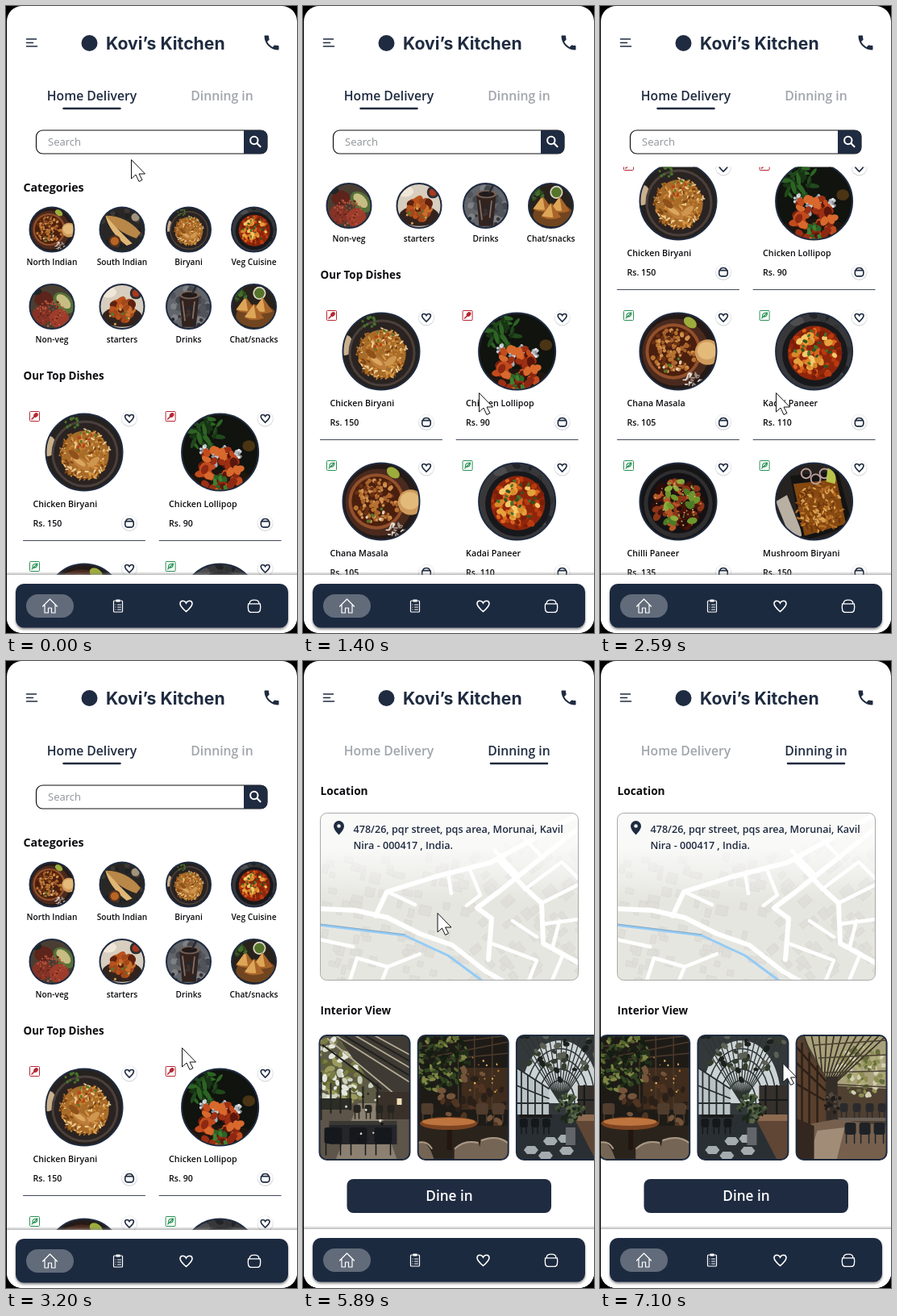
These frames come from a looping animation (361 by 777 pixels, 8 s). An HTML page:

```html
<!DOCTYPE html>
<html lang="en">
<head>
<meta charset="utf-8">
<title>Food ordering app</title>
<style>
html, body { margin: 0; width: 100%; height: 100%; overflow: hidden; background: #000; }
svg { display: block; width: 361px; height: 777px; }
text { font-family: "Open Sans", "Noto Sans", sans-serif; }
.brand { font-family: Inter, sans-serif; }
</style>
</head>
<body>
<svg id="stage" viewBox="0 0 361 777"></svg>
<script>
const LOOP = 8000;
const NAVY = '#1f2b40', INK = '#0c0c10', GREY = '#a1a5ab';

// ---------- drawing helpers ----------
const text = (x, y, s, size, weight = 600, fill = INK, anchor = 'start', cls = '') =>
  `<text x="${x}" y="${y}" font-size="${size}" font-weight="${weight}" fill="${fill}" text-anchor="${anchor}" class="${cls}">${s}</text>`;
const rect = (x, y, w, h, fill, more = '') =>
  `<rect x="${x}" y="${y}" width="${w}" height="${h}" fill="${fill}" ${more}/>`;
const circle = (x, y, r, fill, more = '') => `<circle cx="${x}" cy="${y}" r="${r}" fill="${fill}" ${more}/>`;
const oval = (x, y, rx, ry, fill, turn = 0) =>
  `<ellipse cx="${x}" cy="${y}" rx="${rx}" ry="${ry}" fill="${fill}" transform="rotate(${turn} ${x} ${y})"/>`;
const shape = (d, fill) => `<path d="${d}" fill="${fill}"/>`;
const line = (d, stroke, width = 1) =>
  `<path d="${d}" fill="none" stroke="${stroke}" stroke-width="${width}" stroke-linecap="round" stroke-linejoin="round"/>`;
const use = (id, x, y, scale = 1, more = '') =>
  `<use href="#${id}" transform="translate(${x} ${y}) scale(${scale})" ${more}/>`;

function random(seed) {
  return () => {
    seed = (seed * 16807) % 2147483647;
    return seed / 2147483647;
  };
}

// Scatters n morsels over a disc.
function morsels(seed, n, x, y, spread, size, colors, stretch = 1) {
  const next = random(seed * 7919);
  let out = '';
  for (let i = 0; i < n; i++) {
    const a = next() * 6.283, d = Math.sqrt(next()) * spread;
    const r = size * (0.7 + next() * 0.5);
    out += oval((x + Math.cos(a) * d).toFixed(1), (y + Math.sin(a) * d).toFixed(1),
      (r * stretch).toFixed(1), r.toFixed(1), colors[i % colors.length], Math.round(next() * 180));
  }
  return out;
}

// ---------- food, each inside a disc of radius 48 ----------
const ground = fill => circle(0, 0, 48, fill);
const RICE = ['#d89a48', '#a9651f', '#efcd92', '#7d4414', '#c98434'];
const FRIED = ['#a2481b', '#5f220f', '#cb6e2c', '#b9521c'];

const dishes = {
  biryani: ground('#25211f') + oval(-46, -8, 11, 13, '#c9b08d') + circle(1, 2, 42, '#4b403b') +
    circle(1, 2, 39, '#2a2322') + circle(1, 3, 30, '#a86c2a') +
    morsels(3, 230, 1, 3, 32, 1.1, RICE, 2.4) + oval(-4, 14, 13, 6, '#bd7d3a', 35) + oval(-6, 12, 9, 3, '#dba75f', 35) +
    oval(12, 12, 9, 4, '#cf9650', -40) + oval(-13, 3, 8, 4, '#8f511b', 40) +
    morsels(8, 10, 2, -14, 14, 1.5, ['#4c7a2b', '#b8411c'], 1.5) + morsels(5, 9, -16, -38, 9, 2, ['#47702c']),
  lollipop: ground('#10130e') + morsels(4, 34, -20, -28, 24, 2.6, ['#20491c', '#2d6424', '#173414'], 3) +
    oval(36, -8, 8, 7, '#4a3414') + oval(0, 36, 44, 14, '#20160f') +
    [-20, -7, 7, 21].map((x, i) => line(`M${x} ${-4 + i % 2 * 4}l${3 - i * 2} 16`, '#a9adb2', 6) +
      morsels(50 + i, 12, x, i % 2 * 4 - 2, 6, 2, ['#f1f3f4', '#8a9096', '#c5cbd1'])).join('') +
    morsels(6, 70, 0, 22, 28, 4.2, ['#9c2f13', '#5b160b', '#c24b1d', '#8d2812', '#d8692c'], 1.4) +
    morsels(9, 12, 2, 39, 10, 2.2, ['#3c8230', '#2b6427'], 1.6),
  chana: ground('#241a17') + circle(-3, 1, 42, '#4b2a1e') + circle(-6, 0, 35, '#93502b') + circle(-6, 0, 31, '#4b1f0e') +
    morsels(11, 120, -6, 0, 28, 2.5, ['#a8622b', '#d0904e', '#6a3013', '#b8722f']) +
    circle(37, 1, 16, '#cf9b5c') + oval(36, -1, 12, 11, '#e3ba7a') + oval(15, -36, 9, 6, '#9cad3c', 35) +
    morsels(2, 26, 18, 38, 11, 1, ['#e9dfd5', '#a3938a'], 3) + morsels(7, 10, -5, 20, 14, 1.6, ['#4f7a2c', '#e2d2bb']),
  kadai: ground('#38383a') + morsels(14, 34, 0, 0, 47, 5, ['#222326', '#4d4d4f', '#313235'], 1.5) + circle(1, 3, 41, '#17181b') +
    circle(1, 2, 34, '#8f260b') + morsels(5, 90, 1, 2, 32, 2.8, ['#b83a10', '#d9651f', '#7d1e08'], 1.3) +
    morsels(21, 24, 1, 1, 26, 3.7, ['#e5a13b', '#f4c869', '#d98a2b'], 1.3) +
    morsels(16, 18, 0, 0, 26, 1.8, ['#45712a', '#2f5421'], 1.6),
  chilli: ground('#161516') + circle(0, 3, 43, '#2f2e30') + circle(0, 2, 38, '#131113') +
    morsels(15, 85, 0, 4, 31, 3.8, ['#8c3517', '#481309', '#b45726', '#2c0d08'], 1.4) +
    morsels(10, 16, 2, 4, 29, 4, ['#6f962c', '#4d7a24', '#8cab3d'], 1.6) +
    morsels(19, 40, 0, 2, 30, 1.1, ['#e0a873', '#73a345']),
  mushroom: ground('#26221f') + shape('M-48 0L-34-8-14 42-28 50z', '#b9b0a4') +
    shape('M-30-32L30-38 48 30-14 50z', '#131313') + shape('M-26-22L28-28 40 28-12 43z', '#85480f') +
    morsels(23, 210, 7, 8, 31, 1.3, ['#b87026', '#6d360d', '#dca252', '#8f4f18'], 2.4) +
    [-10, 2, 13].map((x, i) => circle(x, -35 + i % 2 * 7, 6, 'none', 'stroke="#b79a98" stroke-width="2"')).join('') +
    shape('M17-42Q31-36 26-22L15-25z', '#bac34b'),
  dosa: ground('#292725') + morsels(31, 30, 0, 0, 46, 5, ['#3d3832', '#1f2124']) +
    shape('M-36-30Q10-30 40 7L31 19Q-12 6-36-30z', '#b98748') + shape('M-36-30Q-2 8 22 30L10 35Q-28 5-36-30z', '#dfb675') +
    circle(-16, 25, 13, '#53301d') + circle(-16, 25, 9, '#b86524') + circle(29, -27, 9, '#a1937c'),
  kebab: ground('#4a3e32') + oval(26, -8, 27, 18, '#557039', 45) + oval(25, -11, 19, 11, '#c7bd82', 45) +
    oval(-18, -16, 20, 17, '#5d241b') + circle(-22, 19, 21, '#843326') + circle(16, 26, 21, '#9d3c2a') +
    morsels(25, 90, -4, 18, 33, 1.8, ['#ab4b35', '#69221a', '#bd6044']) + oval(-34, -33, 12, 8, '#1f2625'),
  starters: ground('#d8cebf') + oval(-30, -31, 18, 12, '#f1e7d8') + circle(30, -29, 13, '#2f3030') + circle(30, -29, 8, '#a9371f') +
    oval(0, 22, 43, 22, '#33231d') + morsels(27, 45, 1, 5, 25, 6, FRIED, 1.3) +
    morsels(12, 9, -3, 27, 24, 3, ['#d9a350', '#63722b']),
  drinks: ground('#62656a') + morsels(29, 34, 0, 0, 46, 7, ['#51545a', '#7d8085', '#44474c']) +
    shape('M-20-25H23L16 44H-14z', '#32231f') + oval(2, -25, 22, 9, '#736057') + oval(2, -25, 17, 6, '#211a19') +
    line('M8-28L18-48', '#25282d', 4) + line('M-13-11L-8 30M13-10L9 25', '#82736c', 3) +
    morsels(24, 16, 0, 38, 36, 4, ['#24262c', '#393331']),
  chat: ground('#28221b') + oval(5, 20, 44, 25, '#70451f') + circle(12, -29, 14, '#ddd6c9') + circle(12, -29, 11, '#56752b') +
    [[-18, 0], [19, 2], [0, 16]].map(([x, y]) => shape(`M${x} ${y - 22}l22 31q-22 9-43-1z`, '#a9642a') +
      shape(`M${x} ${y - 21}l5 30q-15 1-25-3z`, '#dda657')).join('') +
    morsels(26, 18, -30, -25, 15, 3, ['#456d2c', '#2f4d20'], 1.6),
};

const dish = (kind, x, y, r) =>
  use(kind, x, y, r / 48) + circle(x, y, r, 'none', `stroke="${NAVY}" stroke-width="2"`);

// ---------- interiors, each 112 x 154 ----------
const chair = (x, y, w, h, fill) => rect(x, y, w, h, fill, 'rx="3"') +
  line(`M${x + 2} ${y + h}v${h * 0.7}M${x + w - 2} ${y + h}v${h * 0.7}`, fill, 1.5);
const chairs = (places, y, w, h, fill) => places.map(x => chair(x, y, w, h, fill)).join('');
function fan(x, y, n, color, width = 1) {
  let d = '';
  for (let i = 0; i <= n; i++) d += `M${x} ${y}L${112 * i / n} 0`;
  return line(d, color, width);
}
const arch = (x, y, w, h) => `M${x - w} ${y}C${x - w} ${y - h * 1.35} ${x + w} ${y - h * 1.35} ${x + w} ${y}`;

const interiors = [
  rect(0, 0, 112, 154, '#5d5a46') + morsels(41, 150, 26, 38, 48, 3, ['#9a9b5c', '#cbd0bb', '#5e632f', '#e4e7dd', '#7b7d45'], 1.6) +
    shape('M22 0H112V72L74 72 34 18z', '#3f3b34') + line('M20 0L112 58M44 0L112 40M68 0L112 24M10 4L90 70', '#b3ab94', 1.8) +
    line('M30 0L112 50M56 0L112 32M4 12L76 66', '#1f1f1c', 2) +
    shape('M0 84H112V154H0z', '#5d554a') + shape('M48 84H72L96 154H20z', '#8b8071') + rect(70, 70, 42, 34, '#393129') +
    rect(0, 78, 40, 14, '#2c2d26') + rect(96, 78, 6, 8, '#f0dfb7') +
    line('M2 46V104M14 60V96M26 54V96M38 66V92M54 64V90M72 60V96', '#23231f', 2) +
    chairs([42, 56, 70, 84], 86, 9, 10, '#26241f') + rect(12, 106, 84, 5, '#3a3833') + rect(12, 111, 84, 24, '#25262a') +
    chairs([6, 37, 68], 114, 22, 20, '#15181c') + morsels(46, 14, 54, 103, 38, 1.6, ['#d8d5cd', '#141414']),
  rect(0, 0, 112, 154, '#1e1b17') + rect(54, 40, 58, 52, '#3f2c1d') +
    line('M0 30L112 8M0 14L112 0M30 30L112 22M50 0V90M70 0V90M92 0V92', '#4c3a2a', 1.5) +
    morsels(42, 170, 26, 30, 38, 2, ['#314522', '#58692f', '#141d11', '#7f8545', '#22301a'], 2) +
    morsels(47, 22, 82, 46, 28, 1.1, ['#f0b65b', '#b57635']) + morsels(48, 35, 66, 84, 42, 3.5, ['#513522', '#2b2018', '#74543a'], 1.5) +
    rect(0, 112, 112, 42, '#2a231c') + chairs([4, 72, 92], 84, 15, 14, '#503d2e') +
    rect(36, 110, 6, 32, '#22160f') + oval(38, 109, 36, 8, '#7d4421') + oval(38, 107, 33, 5, '#bd743e') +
    shape('M45 154V140Q56 128 75 132L80 154zM74 154L78 129Q98 122 112 132V154zM0 154V132Q12 128 20 154z', '#756555') +
    line('M46 140Q58 129 74 133M79 130Q98 123 111 133M0 133Q11 130 17 140', '#a99884', 2),
  rect(0, 0, 112, 154, '#33383a') + shape(arch(54, 84, 50, 78) + 'z', '#ccd3d5') +
    fan(54, 84, 14, '#2e3431', 1.3) + [50, 43, 35, 27, 18].map(w => line(arch(54, 84, w, w * 1.55), '#30363a', 1.6)).join('') +
    shape('M0 40L40 66V104H0z', '#b9c2c4') + line('M0 40L40 66M0 62L40 78M0 84H40M6 44V104M14 49V104M23 55V104M32 61V104', '#262b2c', 1.8) +
    morsels(43, 70, 56, 4, 52, 3, ['#1c211d', '#343c2e', '#5b5f54'], 1.4) +
    rect(0, 98, 112, 56, '#2a2f34') + rect(4, 98, 40, 4, '#1b1c1b') + chairs([4, 18, 32], 103, 10, 11, '#14181b') +
    [[18, 142], [42, 131], [36, 149], [62, 143], [60, 128]].map(([x, y]) => shape(`M${x - 9} ${y}l4-5h10l4 5-4 5h-10z`, '#a5acb0')).join('') +
    rect(76, 62, 36, 40, '#35302b') + line('M84 62V100M98 62V100M76 80H112', '#15181a', 2) +
    shape('M70 100H112V154H98z', '#5f4635') + shape('M66 98H112V106H76z', '#8d6b50') +
    rect(61, 114, 12, 22, '#62666a') + morsels(44, 75, 66, 90, 17, 1.9, ['#3e5034', '#596749', '#1c2619'], 1.6),
  rect(0, 0, 112, 154, '#4f4032') + shape('M8 0H112V66L42 62z', '#a8a07a') +
    morsels(45, 110, 82, 44, 32, 2.6, ['#8d8e52', '#d3d0b4', '#666c3b', '#b0ad7c'], 1.4) + fan(34, 72, 12, '#3d342a', 1.8) +
    line('M22 12L112 6M28 28L112 24M32 46L112 44M36 60L112 64', '#4a4032', 1.5) + shape('M0 0L36 52V112H0z', '#5a402c') +
    line('M0 14L36 56M0 34L36 68M0 60L34 80M7 10V110M16 22V110M26 38V108', '#2c2019', 2.5) + rect(37, 51, 14, 67, '#342c27') +
    morsels(49, 30, 44, 84, 12, 2, ['#54483e', '#201c1a']) +
    shape('M0 113L48 104 112 112V154H0z', '#76604d') + shape('M26 118L60 114 50 154H14z', '#a08c77') +
    chairs([54, 70, 86, 101], 84, 10, 11, '#2a2a2c') + rect(52, 102, 60, 4, '#6b6158') +
    chairs([60, 78, 96], 108, 14, 15, '#1e2226') + shape('M0 103L22 112V154H0z', '#33271f'),
];
const photo = (i, x) => `<g transform="translate(${x} 464)"><g clip-path="url(#frame)">${interiors[i]}</g>` +
  rect(0, 0, 112, 154, 'none', `rx="9" stroke="${NAVY}" stroke-width="2"`) + '</g>';

// ---------- pages ----------
const tabs = active => [['Home Delivery', 106.5], ['Dinning in', 268]].map(([s, x], i) =>
  text(x, 117, s, 15.7, 600, i === active ? NAVY : GREY, 'middle') +
  (i === active ? line(`M${x - 35} 127h70`, NAVY, 2.5) : '')).join('');

const categories = [
  ['North Indian', 'chana'], ['South Indian', 'dosa'], ['Biryani', 'biryani'], ['Veg Cuisine', 'kadai'],
  ['Non-veg', 'kebab'], ['starters', 'starters'], ['Drinks', 'drinks'], ['Chat/snacks', 'chat'],
].map(([name, kind], i) => {
  const x = [57, 144, 226.5, 307.5][i % 4], y = i < 4 ? 277 : 372.5;
  return dish(kind, x, y, 27.5) + text(x, y + 44, name, 10.2, 600, INK, 'middle');
}).join('');

const badge = (icon, x, y, scale) => circle(x, y + 0.5, 10, '#d5d7da') + circle(x, y, 9.3, '#fff') +
  use(icon, x, y, scale, `stroke="${NAVY}" stroke-width="2.3" fill="none"`);

const cards = [
  ['Chicken Biryani', 150, 'biryani'], ['Chicken Lollipop', 90, 'lollipop'], ['Chana Masala', 105, 'chana'],
  ['Kadai Paneer', 110, 'kadai'], ['Chilli Paneer', 135, 'chilli'], ['Mushroom Biryani', 150, 'mushroom'],
].map(([name, price, kind], i) => {
  const color = i < 2 ? '#b52732' : '#2a9155';
  const mark = rect(29.5, 502.5, 12, 12, '#fff', `rx="1" stroke="${color}"`) + (i < 2
    ? oval(37, 507, 3.2, 2.4, color, -45) + line('M35 509l-3 3', color, 1.6)
    : line('M32 512l6-6M33 510q-1-5 6-5 0 6-6 5', color, 1.1));
  return `<g transform="translate(${i % 2 * 168.6} ${Math.floor(i / 2) * 186})">${mark}` +
    dish(kind, 97, 553, 47.5) + badge('heart', 153, 511, 0.72) + badge('bag', 153, 640.5, 0.72) +
    text(33.5, 620.5, name, 10.7) + text(33.5, 645, 'Rs. ' + price, 10.6) +
    line('M21.5 662.5H172.5', '#414858') + '</g>';
}).join('');

const delivery = tabs(0) +
  rect(37.5, 154, 286.5, 29, '#fff', 'rx="8" stroke="#111" stroke-width="1.2"') +
  shape('M295 154h21q8 0 8 8v13q0 8-8 8h-21z', NAVY) +
  circle(307.8, 166.5, 4.7, 'none', 'stroke="#fff" stroke-width="2"') + line('M311.5 170.3l4 4', '#fff', 2.2) +
  text(52, 173, 'Search', 13, 400, '#8f9399') +
  `<g clip-path="url(#list)"><g id="content">${text(21.5, 230, 'Categories', 14.2, 700)}${categories}` +
  `${text(21.5, 463, 'Our Top Dishes', 13.4, 700)}${cards}</g></g>`;

function buildings() {
  const next = random(90210);
  let out = '';
  for (let i = 0; i < 150; i++) {
    const x = 22 + next() * 320, y = 225 + next() * 170, w = 5 + next() * 10;
    out += rect(x.toFixed(1), y.toFixed(1), w.toFixed(1), (5 + next() * 8).toFixed(1), '#dfded9',
      `stroke="#d5d4ce" stroke-width=".6" transform="rotate(${x > 200 ? -40 : 12} ${x.toFixed()} ${y.toFixed()})"`);
  }
  return out;
}
const mainRoads = 'M20 307L65 309 105 318 145 338 185 352 226 384 250 398M90 316L104 286 165 267 232 250 342 190' +
  'M216 306L244 285 342 207M216 306L234 319 230 370M244 248L276 282 296 300 298 350 342 374';
const sideRoads = 'M20 345L62 354M58 396L67 368 105 379 145 363M105 379L98 396M105 286L139 302M180 263L184 288' +
  'M206 256L220 290 203 303M265 263L238 235M298 244L270 215M275 283L321 249 342 270M296 300L342 277' +
  'M298 326L342 320M260 322L290 342M234 350L290 371 280 396M318 322L310 354M322 365L309 396';
const map = `<g clip-path="url(#mapbox)">${rect(21, 188, 321, 208, '#e6e6e0')}${buildings()}` +
  line(sideRoads, '#fff', 4.5) + line(mainRoads, '#fff', 6) +
  line('M20 327L126 340 180 365 222 396', '#93cbf6', 3) + line('M20 325.8L126 338.8', '#829fb4', 0.8) +
  rect(21, 188, 321, 110, 'url(#mist)') + '</g>' +
  rect(21.5, 188.5, 320, 207, 'none', 'rx="8" stroke="#a8a8a8"');

const dining = rect(1, 62, 360, 715, '#fff') + tabs(1) + text(21.5, 166, 'Location', 13.7, 700) + map +
  shape('M44.5 215.5Q38 209 38 204.5A6.5 6.5 0 0 1 51 204.5Q51 209 44.5 215.5z', NAVY) + circle(44.5, 204.5, 2.3, '#eee') +
  text(62.5, 212.5, '478/26, pqr street, pqs area, Morunai, Kavil', 12.6, 600, NAVY) +
  text(62.5, 232.5, 'Nira - 000417 , India.', 12.6, 600, NAVY) +
  text(21.5, 438, 'Interior View', 13.5, 700) +
  `<g id="gallery">${interiors.map((_, i) => photo(i, 20.5 + i * 122.2)).join('')}</g>` +
  rect(54.5, 642, 253.5, 42, NAVY, 'rx="8"') + text(181.5, 669, 'Dine in', 17.2, 600, '#fff', 'middle');

const phone = 'M6.6 10.8c1.4 2.8 3.8 5.1 6.6 6.6l2.2-2.2c.3-.3.7-.4 1-.2 1.1.4 2.3.6 3.6.6.6 0 1 .4 1 1V20c0 .6-.4 1-1 1' +
  '-9.4 0-17-7.6-17-17 0-.6.4-1 1-1h3.500c.6 0 1 .4 1 1 0 1.200.2 2.400.6 3.600.1.3 0 .7-.3 1z';
const header = line('M25.5 41h12M25.5 45.5h8M25.5 50h13', NAVY, 1.6) + circle(103.5, 46, 10, NAVY) +
  text(124, 53.5, 'Kovi’s Kitchen', 21.2, 700, NAVY, 'start', 'brand') +
  `<g transform="translate(317.5 33.5)">${shape(phone, NAVY)}</g>`;

const nav = rect(1, 701, 360, 4, 'url(#shade)') + rect(1, 705, 360, 73, '#fff') +
  rect(12, 716, 338, 54.5, NAVY, 'rx="10" filter="url(#soft)"') +
  rect(25, 729, 59, 29, '#626b7a', 'rx="14.5"') +
  line('M45.5 744l9-9 9 9M48 742v10h4.5v-6h4v6H61v-10', '#fff', 1.2) +
  rect(133.5, 737, 11, 14, 'none', 'rx="1" stroke="#fff" stroke-width="1.2"') + rect(136.5, 735.5, 5, 3, '#fff') +
  line('M136 742h.2M136 745h.2M136 748h.2M138.5 742h4M138.5 745h4M138.5 748h4', '#fff') +
  use('heart', 223.5, 743.5, 1, 'stroke="#fff" stroke-width="1.6" fill="none"') +
  use('bag', 308, 743.5, 1.05, 'stroke="#fff" stroke-width="1.3" fill="none"');

const stage = document.getElementById('stage');
stage.innerHTML = `<defs>
  <clipPath id="disc"><circle r="48"/></clipPath>
  <clipPath id="frame"><rect width="112" height="154" rx="9"/></clipPath>
  <clipPath id="list"><rect x="1" y="199.5" width="360" height="506"/></clipPath>
  <clipPath id="mapbox"><rect x="21.5" y="188.5" width="320" height="207" rx="8"/></clipPath>
  <clipPath id="screen"><rect x="1" width="360" height="777" rx="19"/></clipPath>
  <linearGradient id="mist" x2="0" y2="1"><stop stop-color="#fff" stop-opacity=".8"/><stop offset=".4" stop-color="#fff" stop-opacity=".75"/><stop offset="1" stop-color="#fff" stop-opacity="0"/></linearGradient>
  <linearGradient id="shade" x2="0" y2="1"><stop stop-color="#888" stop-opacity="0"/><stop offset="1" stop-color="#888" stop-opacity=".6"/></linearGradient>
  <filter id="soft" x="-5%" y="-20%" width="110%" height="150%"><feDropShadow dx="0" dy="2" stdDeviation="1.7" flood-opacity=".45"/></filter>
  <path id="heart" d="M0 7C-7 1-7.5-1-7.5-3-7.5-7-2-7.5 0-3.5 2-7.5 7.5-7 7.5-3 7.5-1 7 1 0 7z"/>
  <path id="bag" d="M-7.5-2.5H7.5M-7-2.5C-8 4-7 7.5-3.500 7.500H3.500C7 7.500 8 4 7-2.500M-5.500-2.500Q-6-7 0-7T5.500-2.500"/>
  ${Object.entries(dishes).map(([id, art]) => `<g id="${id}" clip-path="url(#disc)">${art}</g>`).join('')}
</defs>
<g clip-path="url(#screen)">
  ${rect(0, 0, 361, 777, '#fff')}${header}${delivery}
  <g id="dining">${dining}</g><g id="nav">${nav}</g>
</g>
<path id="cursor" d="M.5.5V24L6 19l4 8.5 4-2-4-7.5h7.5z" fill="#fff" stroke="#111" stroke-linejoin="round"/>`;

// ---------- motion ----------
// Screen updates come in bursts: [first, last, count].
const bursts = [
  [70, 860, 11], [1190, 1400, 4], [1510, 1890, 6], [1970, 2330, 6], [2590, 3200, 9], [3790, 4580, 11],
  [4650, 4740, 2], [5130, 5290, 3], [5890, 6340, 7], [6700, 7100, 6],
];
function lastUpdate(t) {
  let last = 0;
  for (const [first, end, count] of bursts) {
    if (t < first) break;
    const step = (end - first) / (count - 1);
    last = t >= end ? end : first + Math.floor((t - first) / step) * step;
  }
  return last;
}

const scrollKeys = [[1110, 0], [1400, 125], [1890, 255], [2330, 345], [2590, 311], [2850, 140], [3050, 35], [3200, 0]];
const cursorKeys = [
  [0, 155, 190], [350, 243, 112], [860, 218, 479], [3710, 218, 479], [4180, 253, 13],
  [4580, 251, 112], [4740, 245, 106], [5290, 253, 108], [5890, 166.5, 312], [6340, 226.5, 498],
];
const fadeKeys = [[5050, 0], [5290, 1]];
const swipeKeys = [[6620, 0], [6800, -70], [6960, -125], [7100, -143.5]];

function valueAt(keys, t, k = 1) {
  const i = keys.findIndex(key => key[0] > t);
  if (i < 0) return keys[keys.length - 1][k];
  if (i === 0) return keys[0][k];
  const a = keys[i - 1], b = keys[i];
  return a[k] + (b[k] - a[k]) * (t - a[0]) / (b[0] - a[0]);
}

const byId = id => document.getElementById(id);
const move = (id, x, y) => byId(id).setAttribute('transform', `translate(${x} ${y})`);

function render(time) {
  const t = lastUpdate(time);
  const fade = valueAt(fadeKeys, t);
  move('content', 0, -valueAt(scrollKeys, t));
  move('gallery', valueAt(swipeKeys, t), 0);
  move('nav', 0, -fade);
  move('cursor', valueAt(cursorKeys, t, 1), valueAt(cursorKeys, t, 2));
  byId('dining').setAttribute('opacity', fade);
}

let start;
function tick(now) {
  start ??= now;
  render((now - start) % LOOP);
  requestAnimationFrame(tick);
}
render(0);
requestAnimationFrame(tick);
</script>
</body>
</html>
```
